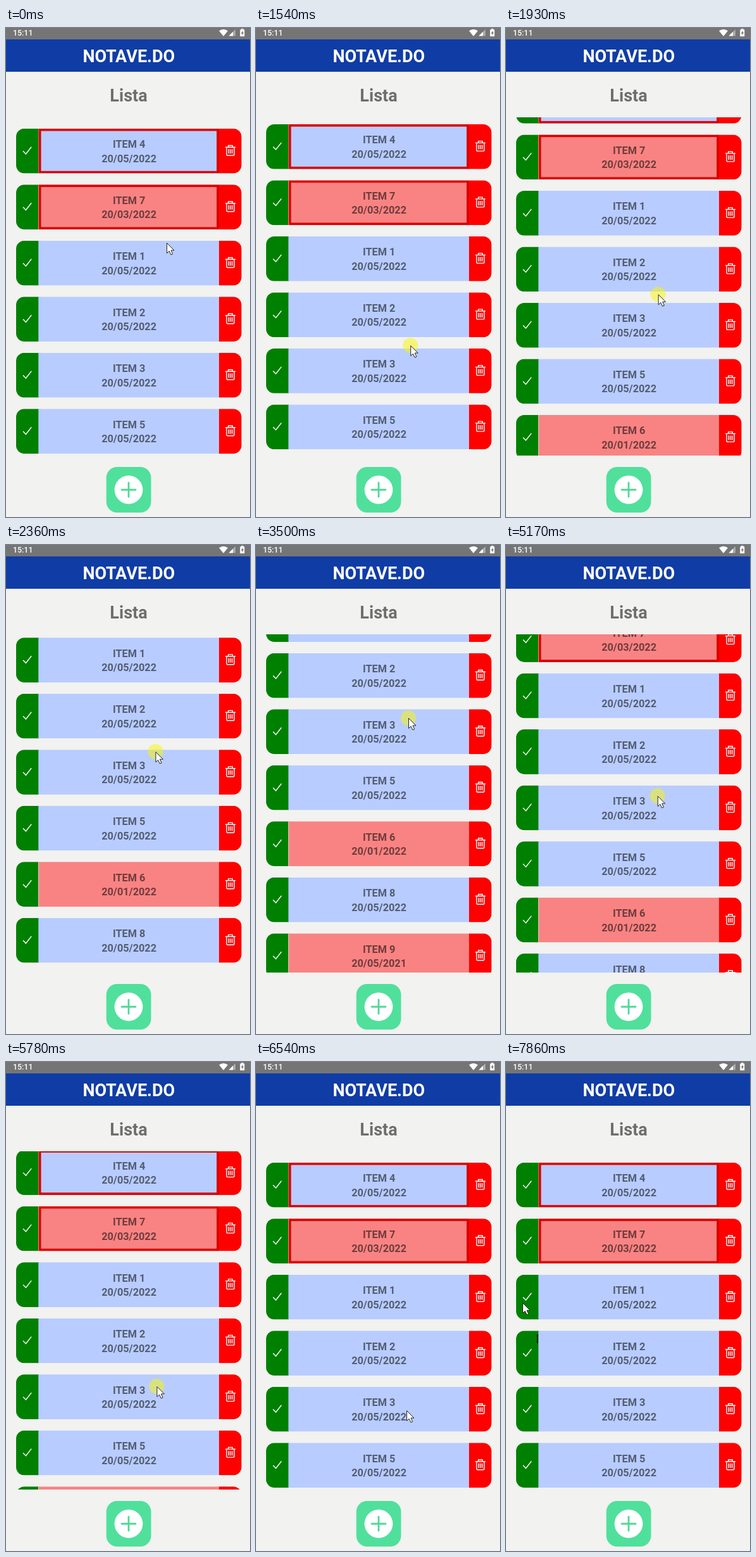
Write an HTML page that moves like this. It is 386 px wide and 772 px high and loops after 8000 ms.

```html
<!DOCTYPE html>
<html lang="pt">
<head>
<meta charset="utf-8">
<title>Lista</title>
<style>
  html, body { margin: 0; width: 100%; height: 100%; overflow: hidden; background: #f2f2f0; }
  svg { display: block; width: 100%; height: 100%; }
  text { font-family: Roboto, sans-serif; font-weight: 700; text-anchor: middle; }
  .label { font-size: 16.3px; fill: rgba(0, 0, 0, .55); }
  .line { fill: none; stroke: #fff; stroke-width: 1.4; }
</style>
</head>
<body>
<svg viewBox="0 0 386 772">
  <defs>
    <clipPath id="listArea"><rect y="141" width="386" height="534"/></clipPath>
    <clipPath id="card"><rect x="16" width="356.5" height="70.8" rx="13"/></clipPath>
    <g id="actions">
      <rect x="16" width="36" height="70.8" fill="#008000"/>
      <rect x="337" width="36" height="70.8" fill="#f00"/>
      <path class="line" d="M27 35.5l4.4 4.6L40.2 29"/>
      <path class="line" d="M347 29.5h16M351.7 29.5v-2.8h6.6v2.8M349 29.5v11.5q0 1.500 1.500 1.500h9q1.500 0 1.500 -1.500V29.5M352.3 32.5v7M355 32.5v7M357.7 32.5v7"/>
    </g>
  </defs>

  <rect width="386" height="772" fill="#f2f2f0"/>
  <rect width="386" height="18" fill="#757575"/>
  <text x="11" y="12.3" font-size="12.4" style="font-weight:500;text-anchor:start" fill="#fff">15:11</text>
  <path d="M344 13L337 4.5Q344 -.5 351 4.5Z" fill="#fff"/>
  <path d="M363 2v10.5h-10.5Z" fill="#fff" opacity=".4"/>
  <path d="M359 6v6.5h-6.5Z" fill="#fff"/>
  <path d="M372 1.2h3.6v1.3h1.7v10.8h-7v-10.8h1.7Z" fill="#fff"/>
  <path d="M374.5 4l-2.700 4.5h1.6v3.2l2.7-4.6h-1.6Z" fill="#757575"/>

  <rect y="18" width="386" height="51.1" fill="#103ca5"/>
  <text x="194.3" y="54" font-size="27" fill="#fff">NOTAVE.DO</text>
  <text x="194" y="116" font-size="27" fill="#6e6e6b">Lista</text>

  <g clip-path="url(#listArea)"><g id="list"></g></g>

  <rect x="158.7" y="693" width="70.8" height="72" rx="17" fill="#50e09c"/>
  <circle cx="194" cy="729" r="22.4" fill="#fff"/>
  <path d="M183 729h22M194 718v22" stroke="#50d896" stroke-width="2.8" stroke-linecap="round"/>

  <rect id="trace" x="49" y="430" width="1.5" height="14"/>
  <g id="cursor">
    <circle id="press" r="12" fill="rgb(250,245,0)" opacity=".5"/>
    <path d="M.5 .5V16.5L4.2 13.2L7 19L9.7 17.8L7 12H12Z" fill="#fff" stroke="#222"/>
  </g>
</svg>
<script>
const LOOP = 8000, PITCH = 88.5, FIRST_TOP = 158.8, SCROLL_END = 253.5;
const byId = id => document.getElementById(id);

const DEFAULT_DATE = '20/05/2022';
const items = [
  { number: 4, alert: true },
  { number: 7, alert: true, late: '20/03/2022' },
  { number: 1 }, { number: 2 }, { number: 3 }, { number: 5 },
  { number: 6, late: '20/01/2022' },
  { number: 8 },
  { number: 9, late: '20/05/2021' }
];

byId('list').innerHTML = items.map(({ number, late, alert }, i) => `
  <g transform="translate(0 ${FIRST_TOP + i * PITCH})">
    <g clip-path="url(#card)">
      <use href="#actions"/>
      <rect x="51.3" width="285.7" height="70.8" fill="${late ? '#f98383' : '#b8ccff'}"/>
      ${late ? '<rect x="51.3" width=".7" height="70.8" fill="#f2f2f0"/>' : ''}
      ${alert ? '<rect x="53.6" y="1.9" width="281.5" height="67" fill="none" stroke="#db0000" stroke-width="3.8"/>' : ''}
    </g>
    <text class="label" x="194.6" y="30.6">ITEM ${number}</text>
    <text class="label" x="194.6" y="53">${late || DEFAULT_DATE}</text>
  </g>`).join('');

// Smooth progress from 0 to 1 between two times.
function ease(t, start, end) {
  const u = Math.min(1, Math.max(0, (t - start) / (end - start)));
  return u * u * (3 - 2 * u);
}

const cursorStart = { x: 254, y: 339 };
const cursorMoves = [
  { start: 300, end: 1140, dx: -8, dy: 201 },
  { start: 1124, end: 2858, dx: -12, dy: -267 },
  { start: 2858, end: 3500, dx: 7, dy: 0 },
  { start: 4244, end: 6247, dx: -3, dy: 277 },
  { start: 6670, end: 7530, dx: -179, dy: -125 },
  { start: 7530, end: 7860, dx: -33, dy: -45 }
];

function cursorAt(t) {
  let { x, y } = cursorStart;
  for (const { start, end, dx, dy } of cursorMoves) {
    const progress = ease(t, start, end);
    x += dx * progress;
    y += dy * progress;
  }
  return { x, y };
}

// The list trails the drag up, then the drag back down.
const scrollAt = t => SCROLL_END * (ease(t, 1400, 2830) - ease(t, 4320, 6082));

function draw(t) {
  const { x, y } = cursorAt(t);
  byId('list').setAttribute('transform', `translate(0 ${-scrollAt(t)})`);
  byId('cursor').setAttribute('transform', `translate(${x} ${y})`);
  byId('press').style.display = t >= 1270 && t < 6540 ? '' : 'none';
  byId('trace').style.display = t >= 7730 ? '' : 'none';
}

const origin = performance.now();
function tick() {
  draw((performance.now() - origin) % LOOP);
  requestAnimationFrame(tick);
}
tick();
</script>
</body>
</html>
```
